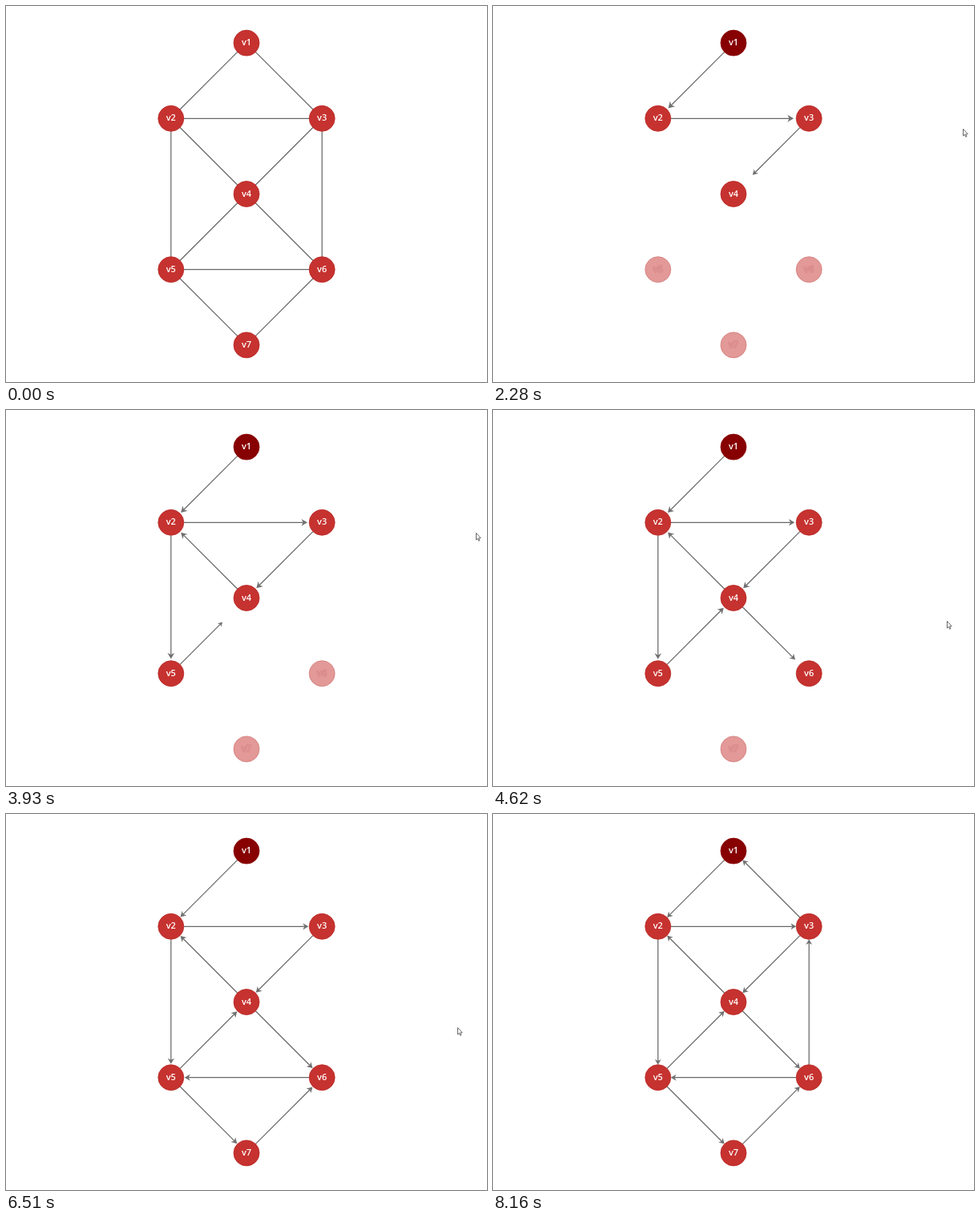
An HTML page with a canvas for the animation above (8280 ms loop, 600 by 469 pixels).

```html
<!DOCTYPE html>
<html lang="en">
<head>
<meta charset="utf-8">
<title>Euler circuit</title>
<style>
  html, body { margin: 0; width: 100%; height: 100%; overflow: hidden; background: #fff; }
  canvas { display: block; }
</style>
</head>
<body>
<canvas id="stage" width="600" height="469"></canvas>
<script>
const ctx = document.getElementById('stage').getContext('2d');
const LOOP = 8280, TICK = 30, END = 8160;
const FIRST = 885, STEP = 567; // start of the walk, time per edge
const R = 16, GAP = 94.2;
const RED = [198, 50, 47], DARK = [135, 0, 2], WHITE = [255, 255, 255];
const FAINT = [226, 153, 151], RIM = [150, 15, 15];

// Three columns, filled in the order middle, left, right.
const nodes = Array.from({ length: 7 }, (_, i) => ({
  x: 300 + GAP * [0, -1, 1][i % 3],
  y: 46.1 + GAP * Math.round(i * 2 / 3)
}));
const walk = [...'1234254657631'].map(n => n - 1);
const edges = walk.slice(1).map((to, i) => [nodes[walk[i]], nodes[to]]);

const pointerMoves = [
  { at: 900, time: 540, x: 586, y: 153 },
  { at: 3930, time: 330, x: 566, y: 263 },
  { at: 5430, time: 510, x: 563, y: 266 },
  { at: 6510, time: 900, x: 524, y: 373 },
  { at: 7620, time: 390, x: 514, y: 471 }
];

const clamp = x => Math.max(0, Math.min(1, x));
const lerp = (a, b, k) => a + (b - a) * k;
const mix = (a, b, k) => a.map((v, i) => lerp(v, b[i], k));
const rgb = c => `rgb(${c.map(Math.round)})`;
const easeOut = x => 1 - (1 - x) ** 3;
const progress = (t, at, time) => easeOut(clamp((t - at) / time));

function polygon(points) {
  ctx.beginPath();
  points.forEach(([x, y]) => ctx.lineTo(x, y));
  ctx.closePath();
}

function line(x1, y1, x2, y2) {
  ctx.beginPath();
  ctx.moveTo(x1, y1);
  ctx.lineTo(x2, y2);
  ctx.stroke();
}

// rest falls from 1 to 0 as all arrows creep up to their nodes
function drawArrow([from, to], grown, rest) {
  const dx = to.x - from.x, dy = to.y - from.y;
  const span = Math.hypot(dx, dy) - 2 * R;
  const tip = R + span * grown * (1 - 0.02 * rest);
  const size = grown * (6.8 + rest);
  ctx.save();
  ctx.translate(from.x, from.y);
  ctx.rotate(Math.atan2(dy, dx));
  line(R, 0, tip - size * 0.6, 0);
  polygon([[tip, 0], [tip - size, -size * 0.58],
           [tip - size * 0.7, 0], [tip - size, size * 0.58]]);
  ctx.fill();
  ctx.restore();
}

function drawNode(i, fill, lit) {
  const { x, y } = nodes[i];
  ctx.beginPath();
  ctx.arc(x, y, R, 0, 2 * Math.PI);
  ctx.fillStyle = rgb(fill);
  ctx.fill();
  ctx.lineWidth = 0.8;
  ctx.strokeStyle = rgb(mix(fill, RIM, lerp(0.2, 0.3, lit)));
  ctx.stroke();

  const label = 'v' + (i + 1);
  ctx.fillStyle = rgb(mix(FAINT, WHITE, lit));
  if (lit < 1) {
    ctx.lineWidth = 1;
    ctx.strokeStyle = `rgba(208, 124, 124, ${1 - lit})`;
    ctx.strokeText(label, x, y + 3);
  }
  ctx.fillText(label, x, y + 3);
}

function drawPointer(t) {
  let x = 601, y = 34;
  for (const move of pointerMoves) {
    const k = progress(t, move.at, move.time);
    x = lerp(x, move.x, k);
    y = lerp(y, move.y, k);
  }
  ctx.save();
  ctx.translate(x, y);
  polygon([[0.5, 0.5], [0.5, 9], [2.4, 7.3], [3.7, 10.3],
           [4.9, 9.7], [3.7, 6.9], [6.2, 6.7]]);
  ctx.fillStyle = '#fff';
  ctx.fill();
  ctx.lineWidth = 0.8;
  ctx.strokeStyle = '#444';
  ctx.stroke();
  ctx.restore();
}

function draw(t) {
  ctx.fillStyle = '#fff';
  ctx.fillRect(0, 0, 600, 469);
  ctx.strokeStyle = '#686868';
  ctx.fillStyle = '#707070';
  ctx.lineWidth = 1.25;

  const fade = clamp((t - 30) / 420);
  ctx.globalAlpha = 1 - fade;
  edges.forEach(([a, b]) => line(a.x, a.y, b.x, b.y));
  ctx.globalAlpha = 1;

  const rest = clamp((END - t) / 5880);
  edges.forEach((edge, i) => {
    const grown = progress(t, FIRST + i * STEP, STEP);
    if (grown > 0.06) drawArrow(edge, grown, rest);
  });

  ctx.font = '600 11px "Open Sans", "Noto Sans", sans-serif';
  ctx.textAlign = 'center';
  ctx.lineJoin = 'round';
  drawNode(0, mix(RED, DARK, fade), 1);
  for (let i = 1; i < nodes.length; i++) {
    const reached = FIRST + (walk.indexOf(i) - 1) * STEP;
    const lit = Math.max(1 - fade, clamp((t - reached - 10) / 90));
    drawNode(i, mix(FAINT, RED, lit), lit);
  }
  drawPointer(t);
}

const start = performance.now();
function frame() {
  const t = (performance.now() - start) % LOOP;
  draw(Math.min(END, Math.floor(t / TICK) * TICK));
  requestAnimationFrame(frame);
}
frame();
</script>
</body>
</html>
```
